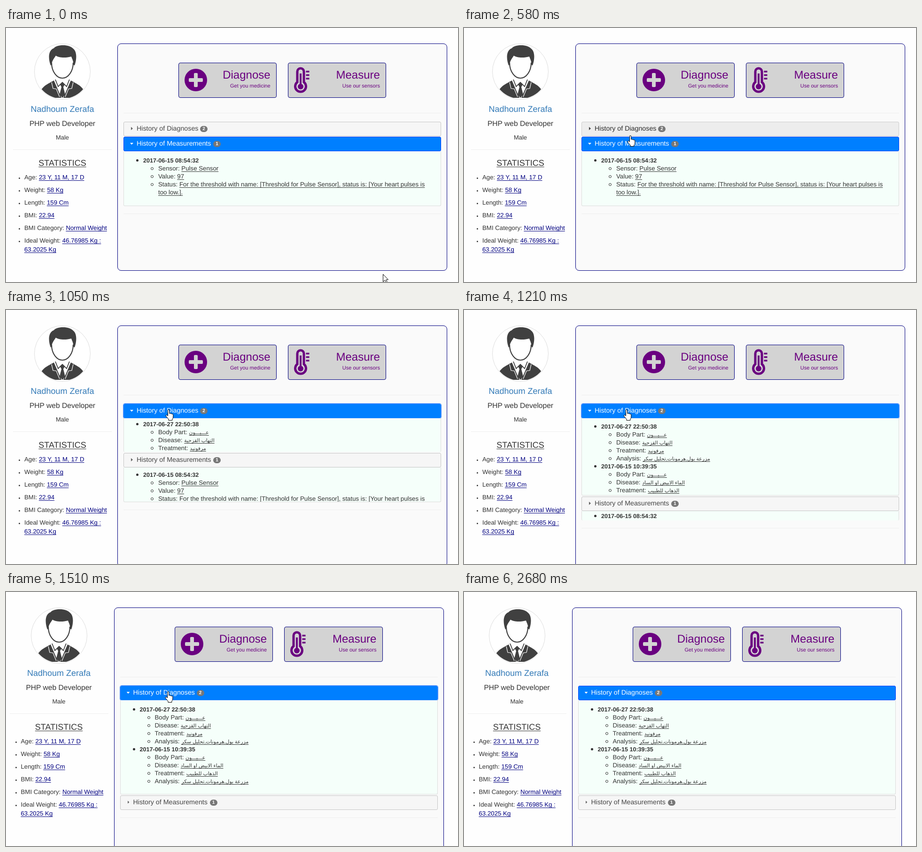
Animation of 962 by 542 pixels, one loop 2790 ms. Source, as an HTML page:

```html
<!DOCTYPE html>
<html lang="en">
<head>
<meta charset="utf-8">
<title>Patient dashboard</title>
<style>
  html, body { margin: 0; width: 100%; height: 100%; overflow: hidden; background: #fefefe; }
  body {
    font-family: "Liberation Sans", "DejaVu Sans", sans-serif;
    color: #333;
    text-rendering: geometricPrecision;
  }
  #stage { position: absolute; left: 0; top: 0; width: 962px; height: 542px; overflow: hidden; }
  #stage div, #stage svg { position: absolute; box-sizing: border-box; }
  #page { left: 0; top: 0; width: 962px; height: 542px; }

  .text { white-space: nowrap; }
  .center { width: 210px; text-align: center; }
  .right { width: 195px; text-align: right; }
  .bold { font-weight: 700; }
  .link { color: #337ab7; }
  u {
    text-decoration: underline 1px;
    text-underline-offset: 2px;
    text-decoration-skip-ink: none;
  }
  .stat u { color: #000080; }
  .ar { font-size: 10.8px; line-height: 0; }

  .rule { height: 1px; background: #eee; }
  .dot { border-radius: 50%; background: #333; }
  .ring { width: 6px; height: 6px; border: 1px solid #333; border-radius: 50%; }

  #panel { left: 237px; top: 33px; width: 702px; border: 1px solid #000080; border-radius: 8px; background: #fafafa; }
  .button {
    top: 74px; width: 209.2px; height: 75px;
    border: 1px solid #000080; border-radius: 4px;
    background: #d3d3d3; color: #6a0080;
  }
  .button svg { left: -1px; top: -1px; }

  .head {
    left: 250px; width: 676px; height: 31px;
    border: 1px solid #c5c5c5; border-radius: 3px;
    background: #f6f6f6; color: #454545;
  }
  .head.hover { background: #ededed; border-color: #ccc; color: #2b2b2b; }
  .head.open { background: #007fff; border-color: #003eff; color: #fff; }
  .head.focus { outline: 1px solid #4d90fe; border-color: #2f84fe; }
  .inner { left: -1px; top: -1px; }
  .arrow { left: 16px; top: 11px; width: 4px; height: 7px; background: #666; clip-path: polygon(0 0, 100% 50%, 0 100%); }
  .hover .arrow { background: #444; }
  .open .arrow { left: 14px; top: 13px; width: 7px; height: 4px; background: #fff; clip-path: polygon(0 0, 100% 0, 50% 100%); }
  .badge {
    top: 9px; width: 16px; height: 13px; border-radius: 7px;
    background: #777; color: #fff;
    font: 700 10px/13px "Liberation Sans", sans-serif; text-align: center;
  }
  .body {
    left: 250px; width: 676px; overflow: hidden;
    border: 1px solid #ddd; border-top: 0; border-radius: 0 0 3px 3px;
    background: #f5fffa;
  }
  #cursor { left: 0; top: 0; overflow: visible; }
</style>
</head>
<body>
<div id="stage">
  <div id="page">
    <svg style="left:60px;top:33px" width="120" height="120" viewBox="60 33 120 120">
      <clipPath id="round"><circle cx="120" cy="93" r="58"/></clipPath>
      <circle cx="120" cy="93" r="59.5" fill="#fff" stroke="#ddd"/>
      <g clip-path="url(#round)" fill="#404040">
        <path d="M71 149C72 126 84 122 102 112L118 149ZM169 149C168 126 156 122 138 112L122 149Z"/>
        <path d="M97 116L100 129 107 130 114 147M143 116L140 129 133 130 126 147" fill="none" stroke="#fff" stroke-width="1.2"/>
        <path d="M105 110L111 125 120 116 129 125 135 110" fill="#fff" stroke="#404040" stroke-width="1.8"/>
        <path d="M115 120L120 116 125 120 122 126 126 142 120 149 114 142 118 126Z"/>
        <path d="M97 74C97 93 108 107 120 107S143 93 143 74" fill="#fff" stroke="#404040" stroke-width="2.2"/>
        <path d="M95 80C90 66 89 48 102 43 106 36 133 33 143 44 151 50 151 66 146 80L143 78C144 71 141 67 139 61 128 64 113 64 106 59 102 65 98 70 97 78Z"/>
      </g>
    </svg>
    <div class="rule" style="left:15px;top:259px;width:210px"></div>

    <div id="panel"></div>
    <div class="button" id="diagnose" style="left:366.6px">
      <svg width="209" height="75" viewBox="367 74 209 75" fill="#d3d3d3">
        <circle cx="404" cy="111" r="24" fill="#6a0080"/>
        <rect x="389" y="107" width="30" height="8" rx="2"/>
        <rect x="400" y="96" width="8" height="30" rx="2"/>
      </svg>
    </div>
    <div class="button" id="measure" style="left:599.9px">
      <svg width="209" height="75" viewBox="600 74 209 75" fill="none" stroke="#6a0080">
        <path d="M620 115.500V93a7 7 0 0 1 14 0V115.500a11.500 11.500 0 1 1-14 0Z" stroke-width="5"/>
        <path d="M627 97V125" stroke-width="4"/>
        <circle cx="627" cy="125" r="6" fill="#6a0080" stroke="none"/>
        <path d="M638.500 93h7m-7 7.500h7m-7 7.500h7" stroke-width="3.500"/>
      </svg>
    </div>
    <div class="rule" style="left:250px;top:181px;width:676px"></div>
    <div class="rule" id="endRule" style="left:250px;width:676px"></div>
  </div>

  <svg id="cursor" width="18" height="24" stroke="#000" fill="#fff" stroke-linejoin="round">
    <path id="pointer" d="M.5 .5V16.500L4.500 13 7 18.500 9.500 17.500 7 12H11.500Z"/>
    <path id="hand" transform="translate(-5.500)" d="M5 14V2.200a1.600 1.600 0 0 1 3.200 0V9a1.600 1.600 0 0 1 3 .6 1.600 1.600 0 0 1 2.800 .8 1.300 1.300 0 0 1 2.300 1V16q0 3-2 5V23.500H6.500V21L1 14.500q-1-2 1-2.500 1.500 0 3 2Z"/>
  </svg>
</div>

<script>
const LOOP = 2790;
const byId = id => document.getElementById(id);
const page = byId('page');

function box(parent, cls, style = '', html = '') {
  const el = document.createElement('div');
  el.className = cls;
  el.style.cssText = style;
  el.innerHTML = html;
  parent.append(el);
  return el;
}

// Places a line of text by its baseline.
function put(parent, x, baseline, size, html, cls = '') {
  const ascent = Math.round(size * .905);
  const lineHeight = ascent + Math.round(size * .212);
  box(parent, 'text ' + cls,
    `left:${x}px;top:${baseline - ascent}px;font-size:${size}px;line-height:${lineHeight}px`, html);
}

put(page, 15, 179, 18, 'Nadhoum Zerafa', 'center link');
put(page, 15, 210, 15.6, 'PHP web Developer', 'center');
put(page, 15, 238, 13, 'Male', 'center');
put(page, 15, 294, 18, '<u>STATISTICS</u>', 'center');

[['Age', '23 Y, 11 M, 17 D'], ['Weight', '58 Kg'], ['Length', '159 Cm'], ['BMI', '22.94'],
 ['BMI Category', 'Normal Weight'], ['Ideal Weight', '46.76985 Kg :']].forEach(([label, value], i) => {
  const y = 323 + 27 * i;
  box(page, 'dot', `left:27px;top:${y - 4}px;width:3px;height:3px`);
  put(page, 39, y, 13.25, `${label}: <u>${value}</u>`, 'stat');
});
put(page, 39, 477, 13.25, '<u>63.2025 Kg</u>', 'stat');

for (const [id, title, note] of [['diagnose', 'Diagnose', 'Get you medicine'], ['measure', 'Measure', 'Use our sensors']]) {
  put(byId(id), 0, 34, 24, title, 'right');
  put(byId(id), 0, 53, 11, note, 'right');
}

function section(title, count, badgeX, rows) {
  const head = box(page, 'head');
  const inner = box(head, 'inner');
  box(inner, 'arrow');
  put(inner, 28, 20, 14.25, title);
  box(inner, 'badge', `left:${badgeX}px`, count);

  const body = box(page, 'body');
  const list = box(body, 'inner');
  rows.forEach(([label, value, arabic], i) => {
    const y = 24 + 17 * i;
    if (!value) {
      box(list, 'dot', `left:27px;top:${y - 7}px;width:5px;height:5px`);
      put(list, 42, y, 12.6, label, 'bold');
      return;
    }
    if (label) box(list, 'ring', `left:58px;top:${y - 7}px`);
    put(list, 74, y, 13.25, `${label && label + ': '}<u${arabic ? ' class="ar"' : ''}>${value}</u>`);
  });
  return { head, body, list };
}

const tests = 'مزرعة بول,هرمونات,تحليل سكر';
const diagnoses = section('History of Diagnoses', 2, 163, [
  ['2017-06-27 22:50:38'],
  ['Body Part', 'عـــيـــون', true],
  ['Disease', 'التهاب القزحية', true],
  ['Treatment', 'مرفونيد', true],
  ['Analysis', tests, true],
  ['2017-06-15 10:39:35'],
  ['Body Part', 'عـــيـــون', true],
  ['Disease', 'الماء الابيض او الساد', true],
  ['Treatment', 'الذهاب للطبيب', true],
  ['Analysis', tests, true]
]);
const measurements = section('History of Measurements', 1, 191, [
  ['2017-06-15 08:54:32'],
  ['Sensor', 'Pulse Sensor'],
  ['Value', '97'],
  ['Status', 'For the threshold with name: [Threshold for Pulse Sensor], status is: [Your heart pulses is'],
  ['', 'too low.].']
]);

// The screen refreshes only at these moments.
const ticks = [0, 70, 143, 216, 289, 362, 434, 507, 580, 670, 730, 900, 1050, 1130, 1210, 1280, 1360,
  1510, 1680, 1755, 1830, 1905, 1980, 2050, 2130, 2220, 2290, 2360, 2680];

// Pointer moves: start, end, destination x, y.
const moves = [[0, 580, 353, 229], [610, 730, 345, 212], [1500, 1510, 344, 212],
  [1560, 2130, 803, 506], [2150, 2360, 907, 548]];

const clamp = v => Math.min(1, Math.max(0, v));
const smooth = u => u * u * (3 - 2 * u);
const swing = u => .5 - Math.cos(Math.PI * u) / 2;

function pointerAt(t) {
  let x = 802, y = 525;
  for (const [start, end, toX, toY] of moves) {
    const k = smooth(clamp((t - start) / (end - start)));
    x += (toX - x) * k;
    y += (toY - y) * k;
  }
  return [Math.round(x), Math.round(y)];
}

function setBody({ body, list }, top, height, openness) {
  body.style.display = height > 0 ? 'block' : 'none';
  body.style.top = top + 'px';
  body.style.height = height + 'px';
  body.style.borderBottomWidth = openness > .5 ? '1px' : '0';
  list.style.top = Math.round(-11.5 * (1 - openness)) + 'px';
}

function render(time) {
  const t = ticks.filter(k => k <= time).pop();
  const switched = t >= 1050;
  const p = switched ? swing(clamp((t - 839) / 512)) : 0;
  const top1 = 200, headHeight = 31;
  const top2 = Math.floor(232.4 + 202 * p);
  const height2 = Math.floor(117 * (1 - p));
  const ruleY = top2 + headHeight + height2 + 16;
  const [x, y] = pointerAt(t);
  const over = top => y >= top && y < top + headHeight && x > 250 && x < 926;

  page.style.left = t >= 1280 ? '-7.5px' : '0';
  diagnoses.head.style.top = top1 + 'px';
  measurements.head.style.top = top2 + 'px';
  diagnoses.head.classList.toggle('open', switched);
  measurements.head.classList.toggle('open', !switched);
  diagnoses.head.classList.toggle('hover', over(top1));
  diagnoses.head.classList.toggle('focus', t >= 900 && t < 2680);
  setBody(diagnoses, 231, top2 - 2 - 231, p);
  setBody(measurements, top2 + headHeight, height2, 1 - p);
  byId('endRule').style.top = ruleY + 'px';
  byId('panel').style.height = ruleY + 122 - 33 + 'px';

  const onHead = over(top1) || over(top2);
  byId('cursor').style.transform = `translate(${x}px, ${y}px)`;
  byId('hand').style.display = onHead ? '' : 'none';
  byId('pointer').style.display = onHead ? 'none' : '';
}

const origin = performance.now();
function frame() {
  render((performance.now() - origin) % LOOP);
  requestAnimationFrame(frame);
}
frame();
</script>
</body>
</html>
```
